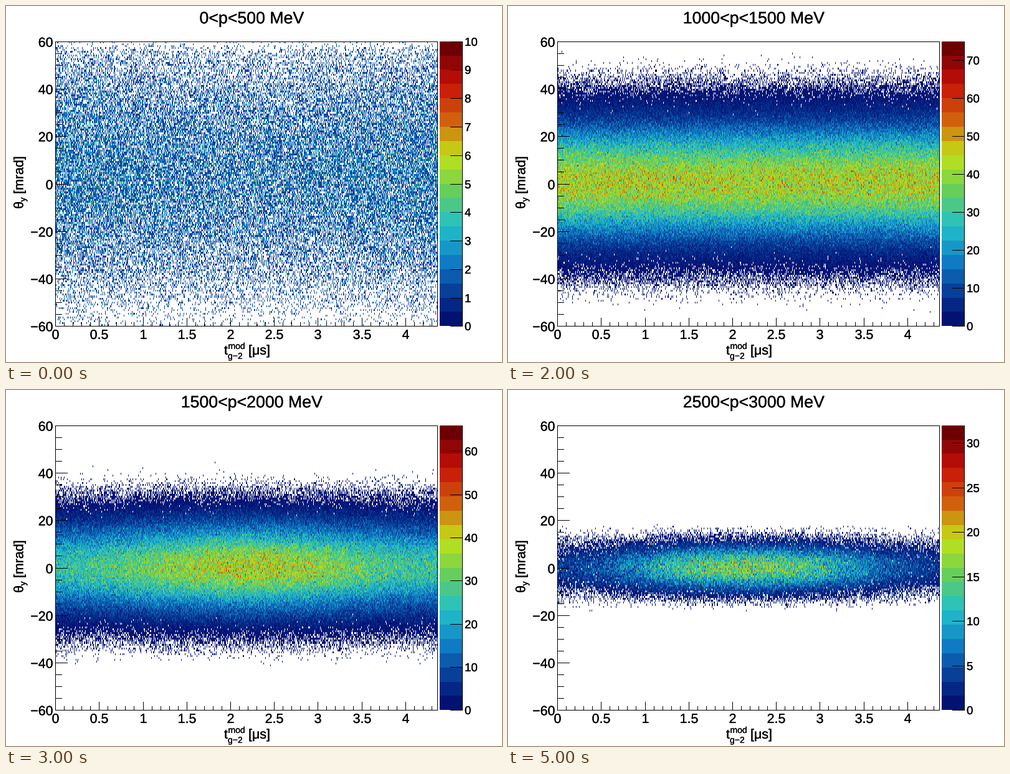
A matplotlib script that plays this animation: 796x572 px, repeating every 6 s.

```python
import numpy as np
import matplotlib.pyplot as plt
from matplotlib.animation import FuncAnimation
from matplotlib.patches import Rectangle
from matplotlib.patheffects import withStroke

W, H, DPI = 796, 572, 64
# Plot edges as exact fractions of the stage; pixels are their floors.
X0, X1 = 0.1 * W, 0.87 * W
Y0, Y1 = 0.9 * H, 0.1 * H
LEFT, RIGHT, TOP, BOTTOM = int(X0), int(X1), int(Y1), int(Y0)
BAR_L, BAR_R = 696, 732
PERIOD = 4.365          # us, full width of the time axis
NX, NY, NCOL = 613, 150, 20

# zmax, label step, mean height, time modulation, centre, sigma, acceptance edge
SLICES = [
    (10, 1, 1.22, 0.09, 5.0, 30.0, 66),
    (51, 10, 23.0, 0.12, 0.3, 21.5, 64),
    (75, 10, 43.0, 0.01, 0.9, 15.0, 48),
    (66, 10, 32.0, -0.20, 0.2, 11.7, 37),
    (51, 10, 20.5, -0.38, 0.2, 8.5, 25),
    (32, 5, 9.8, -0.62, 0.0, 5.8, 16),
]

STOPS = np.linspace(0, 1, 9)
RED = [0, 5, 15, 35, 102, 196, 208, 199, 110]
GREEN = [0, 48, 124, 192, 206, 226, 97, 16, 0]
BLUE = [99, 142, 198, 201, 90, 22, 13, 8, 2]


def make_palette():
    pos = np.floor((np.arange(NCOL) + 0.99) * 255 / NCOL) / 254
    chans = [np.interp(pos, STOPS, c) for c in (RED, GREEN, BLUE)]
    return np.round(np.stack(chans, axis=1)).astype(np.uint8)


PALETTE = make_palette()


def x_pix(frac):
    return int(X0 + (X1 - X0) * frac)


def y_pix(frac):
    return int(Y0 - (Y0 - Y1) * frac + 1e-6)


def row_bins(n):
    """Bin number, counted from below, of each pixel row of the plot."""
    rows = np.arange(TOP, BOTTOM)
    return ((Y0 - rows - 1) / (Y0 - Y1) * n).astype(int)


def col_bins(n):
    cols = np.arange(LEFT, RIGHT)
    return ((cols + 1 - X0) / (X1 - X0) * n).astype(int)


def histogram(k):
    """Colour image of slice k, one array cell per screen pixel."""
    zmax, _, height, mod, centre, sigma, edge = SLICES[k]
    rng = np.random.default_rng(40 + k)
    t = (np.arange(NX) + 0.5) / NX
    y = -60 + (np.arange(NY) + 0.5) * 120 / NY
    d = y - centre
    shape = np.exp(-0.5 * (d / sigma) ** 2 - (d / edge) ** 10)
    if k < 2:
        shape *= 0.3 + 0.7 / (1 + np.exp((y - 57.5) / 0.5))
    mean = height * np.outer(shape, 1 + mod * np.cos(2 * np.pi * t))
    counts = np.minimum(rng.poisson(mean), zmax)
    level = np.minimum((counts * NCOL / zmax + 0.01).astype(int), NCOL - 1)
    img = PALETTE[level]
    img[counts == 0] = 255
    return img[row_bins(NY)][:, col_bins(NX)]


plt.rcParams["text.hinting"] = "none"
fig = plt.figure(figsize=(W / DPI, H / DPI), dpi=DPI, facecolor="white")
ax = fig.add_axes([0, 0, 1, 1])
ax.set_axis_off()


def show(img, x0, x1):
    return ax.imshow(img, extent=(x0, x1, BOTTOM, TOP),
                     interpolation="nearest", aspect="auto")


def box(x0, y0, x1, y1):
    """Black pixel block, both ends included."""
    return ax.add_patch(Rectangle((x0, y0), x1 - x0 + 1, y1 - y0 + 1,
                                  fc="black", lw=0, antialiased=False))


def text(x, y, s, px=21.4, ha="center", rot=0):
    bold = [withStroke(linewidth=0.3, foreground="black")]
    return ax.text(x, y, s, fontsize=px * 72 / DPI, ha=ha, va="baseline",
                   rotation=rot, rotation_mode="anchor", color="black",
                   family="Liberation Sans", path_effects=bold)


def label(v):
    return f"{v:g}".replace("-", "\u2212")


def draw_axes():
    box(LEFT, TOP, RIGHT, TOP)
    box(LEFT, BOTTOM, RIGHT, BOTTOM)
    box(LEFT, TOP, LEFT, BOTTOM)
    box(RIGHT, TOP, RIGHT, BOTTOM)
    box(BAR_R, TOP, BAR_R, BOTTOM)
    for i in range(44):
        x = x_pix(i * 0.1 / PERIOD)
        major = i % 5 == 0
        box(x, BOTTOM - (13 if major else 6), x, BOTTOM)
        if major:
            text(x + 0.5, 535, label(i / 10))
    for v in range(-60, 61, 5):
        y = y_pix((v + 60) / 120)
        major = v % 20 == 0
        box(LEFT, y, LEFT + (19 if major else 10), y)
        if major:
            text(75.5, y + 8.5, label(v), ha="right")


def draw_titles():
    text(350, 560, "t", ha="left")
    text(356.5, 551, "mod", 14, ha="left")
    text(356, 567, "g\u22122", 14, ha="left")
    text(389, 560, "[\u03bcs]", ha="left")
    text(27.5, 326, "\u03b8", ha="left", rot=90)
    text(31.5, 314.5, "y", 14, ha="left", rot=90)
    text(27.5, 302, "[mrad]", ha="left", rot=90)


images = [histogram(k) for k in range(len(SLICES))]
plot = show(images[0], LEFT, RIGHT)
bands = PALETTE[row_bins(NCOL)]
show(np.repeat(bands[:, None], BAR_R - BAR_L, axis=1), BAR_L, BAR_R)
draw_axes()
draw_titles()
title = text(394.5, 28, "", 26.7)
ax.set_xlim(0, W)
ax.set_ylim(H, 0)
scale = []


def draw(k):
    while scale:
        scale.pop().remove()
    plot.set_data(images[k])
    title.set_text(f"{500 * k}<p<{500 * (k + 1)} MeV")
    zmax, step = SLICES[k][:2]
    for v in range(0, zmax + 1, step):
        y = y_pix(v / zmax)
        scale.append(box(713, y, BAR_R, y))
        scale.append(text(736, y + 7, label(v), 18.7, ha="left"))
    return [plot, title, *scale]


anim = FuncAnimation(fig, draw, frames=len(SLICES), interval=1000,
                     init_func=lambda: draw(0), repeat=True, repeat_delay=0,
                     blit=False)
plt.show()
```
